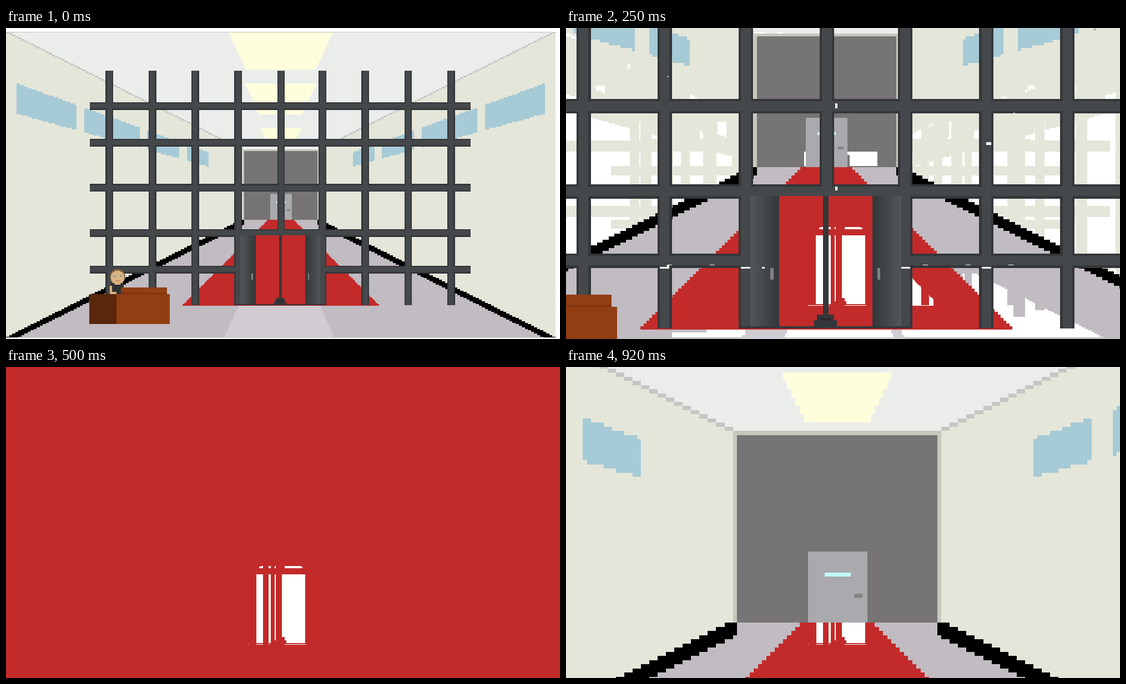
An HTML page with a canvas that plays this animation: 998 by 561 pixels, repeating every 1.01 s.

```html
<!DOCTYPE html>
<html lang="en">
<head>
<meta charset="utf-8">
<title>Through the gate</title>
<style>
  html, body { margin: 0; width: 100%; height: 100%; overflow: hidden; background: #fff; }
  canvas { display: block; width: 100vw; height: 100vh; }
</style>
</head>
<body>
<canvas id="stage" width="998" height="561"></canvas>
<script>
const W = 998, H = 561, LOOP = 1010, COUNT = 12, TURN = 6;
const view = document.getElementById('stage').getContext('2d');
const buffer = document.createElement('canvas');
buffer.width = W;
buffer.height = H;
const ctx = buffer.getContext('2d', { willReadFrequently: true });

const C = {
  wall: '#e5e6da', ceiling: '#ebedeb', trim: '#c6c5c4', frame: '#c7c7bd', back: '#767474',
  door: '#aaa9ad', slot: '#c4fcfc', knob: '#848484', floor: '#c1bbc2', strip: '#d1cbd3',
  carpet: '#c32a2a', light: '#fefedc', glass: '#a6cad6', bar: '#45484b', edge: '#34373a',
  handle: '#808284', deskSide: '#5a270c', desk: '#913e13', deskLine: '#7b3410',
  skin: '#d9b380', hair: '#806442', suit: '#303136', eye: '#78a4ae', mouth: '#c09468'
};

const mix = (a, b, t) => a + (b - a) * t;
const startOf = n => Math.round(n * 25 / 3) * 10;

// The visible width shrinks evenly up to the turn, then grows evenly again
const START = 2.765, NEAR = 0.0208;
let zoom, panX, panY;

function aim(n) {
  const ahead = n < TURN;
  zoom = 1 / (ahead ? mix(1 / START, NEAR, n / TURN) : NEAR + 0.02245 * (n - TURN));
  panX = ahead ? -189.5 * (zoom - START) : 576.4 - 190.7 * zoom;
  panY = ahead ? 6.3 - 161.8 * (zoom - START) : 808.4 - 169.2 * zoom;
}

// Box in art units, snapped to whole screen pixels
function box(color, x, y, w, h) {
  const x0 = Math.round(x * zoom + panX), y0 = Math.round(y * zoom + panY);
  const x1 = Math.round((x + w) * zoom + panX), y1 = Math.round((y + h) * zoom + panY);
  ctx.fillStyle = color;
  ctx.fillRect(x0, y0, x1 - x0, y1 - y0);
}

function disc(color, cx, cy, r) {
  for (let y = Math.floor(cy - r); y < cy + r; y++) {
    const half = Math.sqrt(Math.max(0, r * r - (y + 0.5 - cy) ** 2));
    box(color, cx - half, y, 2 * half, 1);
  }
}

// One column of the side wall, d units in from the outer edge
function wallColumn(x, d) {
  const line = Math.floor(d / 2), k = Math.ceil((154 - d) / 2);
  box(C.ceiling, x, -6, 1, line + 6);
  box(C.trim, x, line, 1, 1);
  box(C.wall, x, line + 1, 1, 210);
  box(C.floor, x, 126 + k, 1, 90 - k);
  box('#000', x, 122 + Math.max(1, k), 1, k ? 4 : 3);
}

function ceilingLight(y, h, half, endHalf) {
  for (let i = 0; i < h; i++) {
    const w = Math.round(mix(half, endHalf, i / (h - 1)));
    box(C.light, 179 - w, y + i, 2 * w, 1);
  }
}

function windowPair(from, to) {
  for (let x = from; x < to; x++) {
    const y = Math.round(31.5 + 0.36 * x), h = Math.round(51.9 + 0.275 * x) - y;
    box(C.glass, x, y, 1, h);
    box(C.glass, 357 - x, y, 1, h);
  }
}

function hall() {
  box(C.ceiling, 154, -6, 50, 83);
  for (let x = -4; x < 363; x++) {
    const d = Math.min(x, 357 - x);
    if (d <= 154) wallColumn(x, d);
  }

  ceilingLight(0, 25, 34, 23);
  ceilingLight(34, 20, 23, 14.4);
  ceilingLight(63, 12, 13, 8);
  windowPair(7, 46);
  windowPair(51, 87);
  windowPair(92, 113);
  windowPair(118, 132);

  box(C.frame, 154, 77, 50, 46);
  box(C.back, 155, 78, 48, 45);
  box(C.floor, 155, 123, 48, 90);
  box(C.door, 172, 106, 14.2, 17);
  box(C.slot, 176, 111, 6.3, 1);
  box(C.knob, 183, 116, 2, 1);

  for (let i = 0; i < 56; i++) box(C.carpet, 170 - i, 123 + i, 18 + 2 * i, 1);
  for (let i = 0; i < 24; i++) {
    const half = Math.round(26.8 + 0.45 * i);
    box(C.strip, 178 - half, 179 + i, 2 * half, 1);
  }
}

function bars(color, inset) {
  const thick = 5 - 2 * inset;
  for (let i = 0; i < 9; i++) {
    const x = 64.9 + 27.95 * i - (i > 4 ? 1 : 0);
    box(color, x + inset, 25.5, thick, (i === 4 ? 132 : 178.6) - 25.5);
  }
  for (const y of [46.1, 70, 99.5, 128.9]) box(color, 54.6, y + inset, 248.1, thick);
  for (const x of [54.6, 207.5]) box(color, x, 152.8 + inset, 95.3, thick);
}

function gate() {
  const top = 132.9;
  bars(C.edge, 0);
  bars(C.bar, 0.85);
  box(C.carpet, 162.8, top, 32, 1.2);
  for (let i = 0; i < 10; i++) {
    const g = Math.round(mix(82, 53, i / 9));
    const tone = `rgb(${g},${g + 3},${g + 6})`;
    box(tone, 152.8 + i, top, 1, 45.3);
    box(tone, 203.8 - i, top, 1, 45.3);
  }
  box(C.handle, 159.7, 157.8, 1.1, 4);
  box(C.handle, 196.6, 157.8, 1, 4);
  box(C.edge, 177.8, top, 1.9, 45);
  box(C.edge, 149, 178, 59.5, 0.7);
  box(C.edge, 175.8, 173.9, 5.9, 2);
  box(C.edge, 174.7, 175.9, 8, 2.2);
  box('#292b2d', 177, 175, 3.6, 1);
}

function guard() {
  box(C.suit, 68, 164, 8.5, 8);
  box(C.skin, 67.8, 166, 1.3, 5.2);
  box(C.skin, 68.5, 170, 3.5, 1.2);
  disc(C.hair, 72.7, 160, 5);
  disc(C.skin, 72.7, 160.5, 4.4);
  box(C.eye, 70.3, 159, 1.3, 1);
  box(C.eye, 74.2, 159, 1.3, 1);
  box(C.mouth, 71.4, 162.3, 3, 0.8);

  box(C.deskSide, 54.2, 171.2, 17.6, 19.6);
  box(C.desk, 71.8, 171.2, 35, 19.6);
  box(C.desk, 75, 167, 30, 4.2);
  box(C.deskLine, 75, 170.6, 30, 0.6);
}

function margins() {
  const fill = (color, ...r) => { ctx.fillStyle = color; ctx.fillRect(...r); };
  fill('#fff', 0, 0, W, 7);
  fill('#fff', 990, 0, 8, H);
  fill('#fff', 0, 559, W, 2);
  fill('#c0c0c0', 0, 7, 990, 1);
  fill('#c0c0c0', 0, 558, 990, 1);
}

const pixels = img => new Uint32Array(img.data.buffer);

function render() {
  const frames = [], held = new Uint8Array(W * H).fill(1);
  let base;
  for (let n = 0; n < COUNT; n++) {
    aim(n);
    hall();
    if (n < TURN) {
      gate();
      guard();
    }
    if (n === 0) margins();
    const img = ctx.getImageData(0, 0, W, H), px = pixels(img);
    if (n === 0) base = px;
    // Pixels that have never changed since the start are left blank
    else for (let i = 0; i < px.length; i++) {
      if (held[i] && px[i] === base[i]) px[i] = 0xffffffff;
      else held[i] = 0;
    }
    frames.push(img);
  }
  return frames;
}

const frames = render();
let shown = -1;

function tick() {
  const t = performance.now() % LOOP;
  let n = COUNT - 1;
  while (startOf(n) > t) n--;
  if (n !== shown) view.putImageData(frames[shown = n], 0, 0);
  requestAnimationFrame(tick);
}
tick();
</script>
</body>
</html>
```
